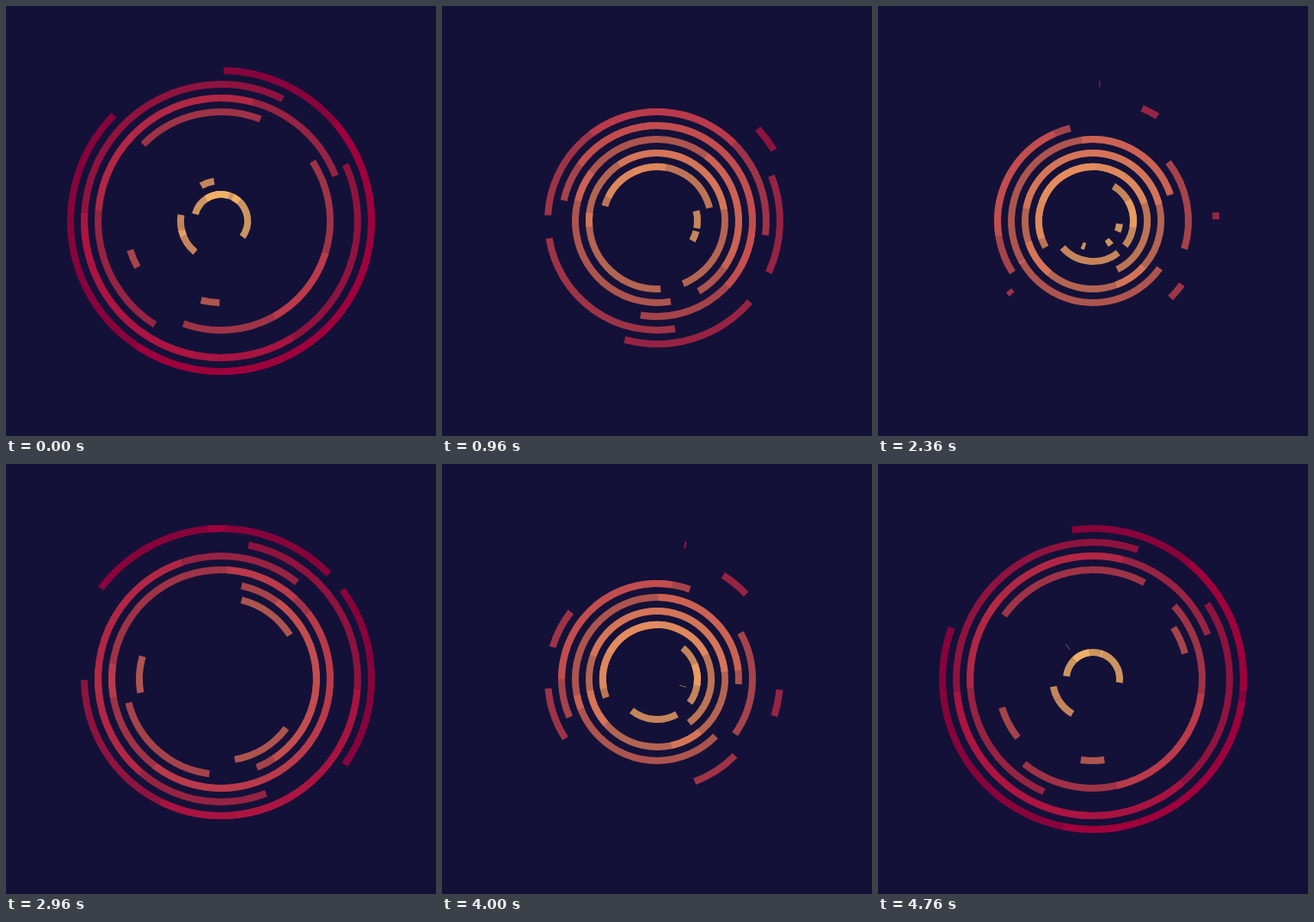
Recreate the animation shown at these times as an HTML page with a canvas. Size 500 by 500 pixels, loop 4800 ms.

```html
<!DOCTYPE html>
<html lang="en">
<head>
<meta charset="utf-8">
<title>Orbiting arcs</title>
<style>
  html, body { margin: 0; width: 100%; height: 100%; overflow: hidden; background: #141138; }
  canvas { display: block; width: 500px; height: 500px; }
</style>
</head>
<body>
<canvas id="stage" width="500" height="500"></canvas>
<script>
const ctx = document.getElementById('stage').getContext('2d');
const TAU = Math.PI * 2;
const STEP = 40;      // ms per picture
const CYCLE = 40;     // pictures per turn
const OUTER = [164, 0, 60];
const INNER = [250, 183, 105];

// Per ring, from the outside in: [start angle, shortest, longest] in degrees.
// A negative length means the arc is hidden for part of the turn.
const RINGS = [
  [[271, -25, 118], [319, -118, 184], [17.6, -130, 230]],
  [[335.6, -60, 204], [58.3, -163, 240], [101.5, 0.5, 82]],
  [[122.5, -2, 118], [185, -13, 179], [222, -80, 85]],
  [[224.5, -60, 152], [327, -108, 230], [17, -128, 242]],
  [[151, -25.5, 101], [336.4, -106, 232], [0, -130, 193]],
  [[91, 8, 88], [338.5, -101.5, 226], [224.3, -62, 137]],
  [[231, -30, 120], [319, -90, 216], [20, -119, 239]],
  [[340, -117, 218], [350, -80, 130], [30, -130, 255]],
  [[129.5, -8, 105], [158.5, -26, 114], [240.5, -81, 169]],
  [[195, -62, 155], [236, -55, 130], [296, -91, 179]]
];

const radians = degrees => degrees * Math.PI / 180;

function ringColor(i) {
  const mix = OUTER.map((c, n) => Math.round(c + (INNER[n] - c) * i / (RINGS.length - 1)));
  return `rgba(${mix}, 0.8)`;
}

function draw(step) {
  const turn = step / CYCLE * TAU;
  ctx.fillStyle = '#141138';
  ctx.fillRect(0, 0, 500, 500);
  ctx.lineWidth = 8;
  RINGS.forEach((arcs, i) => {
    const peak = (43.25 - 4 * i) / CYCLE * TAU;
    const wave = (1 + Math.cos(turn - peak)) / 2;
    ctx.strokeStyle = ringColor(i);
    for (const [angle, low, high] of arcs) {
      const length = low + (high - low) * wave;
      if (length <= 0) continue;
      const from = radians(angle) + turn;
      ctx.beginPath();
      ctx.arc(250, 250, 175 - 16 * i, from, from + radians(length));
      ctx.stroke();
    }
  });
}

const start = performance.now();
function tick() {
  const elapsed = performance.now() - start;
  draw(Math.floor((elapsed + 2) / STEP) % CYCLE);
  requestAnimationFrame(tick);
}
tick();
</script>
</body>
</html>
```
